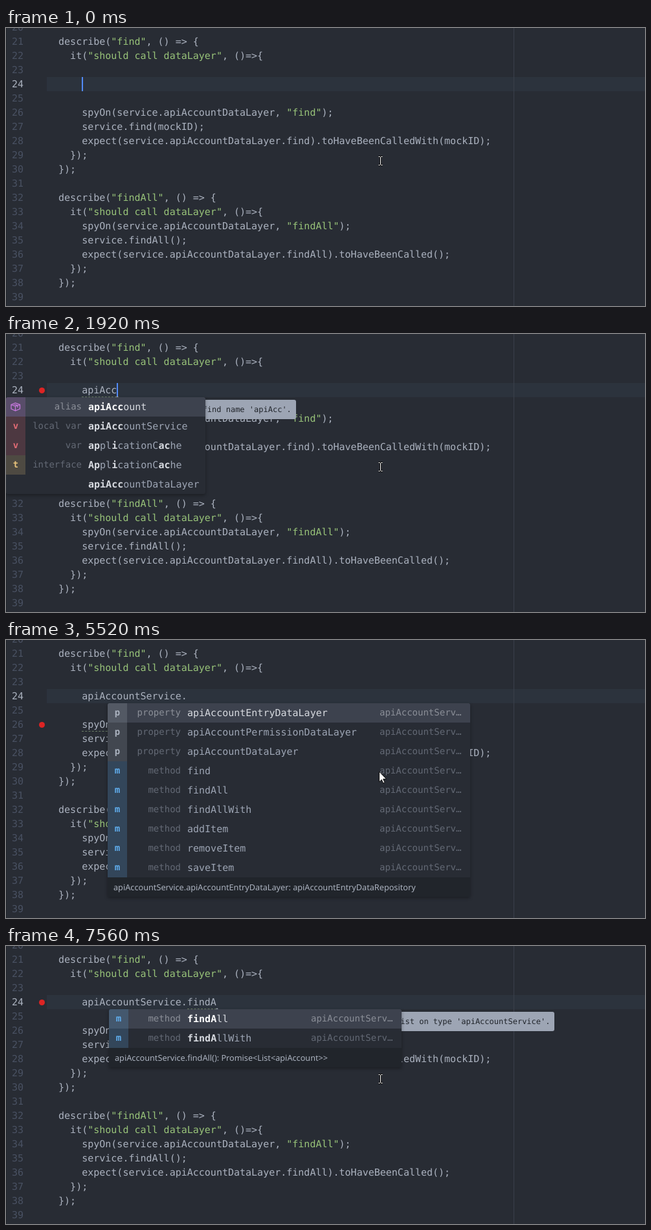
Recreate the animation shown at these times as an HTML page. Size 987 px wide and 431 px high, loop 8000 ms.

```html
<!DOCTYPE html>
<html lang="en">
<head>
<meta charset="utf-8">
<title>Autocomplete in a code editor</title>
<style>
html, body { margin: 0; width: 100%; height: 100%; overflow: hidden; background: #282c34; }
#stage { position: relative; width: 987px; height: 431px; overflow: hidden; color: #abb2bf;
  font: 15px/22px "DejaVu Sans Mono", monospace; white-space: pre; text-rendering: geometricPrecision; }
#stage *, #stage ::before { position: absolute; box-sizing: border-box; }
#stage i, #stage b { position: static; }
i { font-style: normal; color: #98c379; }
.edge { left: 0; width: 1px; height: 431px; background: #1f2329; }
.guide { left: 784px; width: 1px; height: 431px; background: #3a3f4a; }
.now { left: 63px; right: 0; top: 76px; height: 22px; background: #2c333d; }
.num { left: 0; width: 27px; text-align: right; color: #495162; }
.num.on { color: #abb2bf; }
.code { left: 63px; }
.caret { top: 76px; width: 2px; height: 22px; background: #528bff; }
.wave { height: 22px; border-bottom: 1px dashed #6c7f66; }
.dot { left: 51px; width: 9px; height: 9px; border-radius: 50%; background: #dd2424; }
.tip { top: 102px; height: 30px; padding: 0 7px 0 92px; border-radius: 3px; background: #9da5b4;
  color: #21252b; font-size: 12px; line-height: 30px; }
.tip::before { content: ""; left: 5px; top: -6px; border: 6px solid transparent; border-top: 0; border-bottom-color: #9da5b4; }
.pop { top: 98px; border-radius: 3px; background: #282c34; box-shadow: 0 2px 5px rgba(0, 0, 0, .35); overflow: hidden; }
.clip { inset: 0; border-radius: 3px; overflow: hidden; }
.row { left: 0; height: 30px; line-height: 30px; color: #9da5b4; }
.row.on { background: #3d424e; color: #d7dae0; }
.row b { color: #d7dae0; }
.row.on b { color: #fff; }
.icon { left: 0; width: 30px; height: 30px; text-align: center; font-weight: bold; font-size: 14px; }
.icon::before { content: ""; inset: 0; background: currentColor; opacity: .2; }
.icon svg { left: 0; top: 0; }
.kind, .side { font-size: 14px; opacity: .5; }
.side { right: 8px; max-width: 132px; overflow: hidden; text-overflow: ellipsis; }
.foot { left: 0; right: 0; height: 30px; padding-left: 9px; background: #21252b; color: #abb2bf;
  font: 12.7px/30px "Noto Sans", sans-serif; }
.bar { right: 3px; top: 3px; width: 4px; height: 137px; border-radius: 2px; background: #424752; }
.mouse { left: 570px; top: 196px; }
</style>
</head>
<body>
<div id="stage"></div>
<script>
const LOOP = 8000, LEFT = 63, CHAR = 9.03;
const stage = document.getElementById('stage');
const lineTop = n => 76 + (n - 24) * 22;
const colX = c => LEFT + c * CHAR;
const esc = s => s.replace(/&/g, '&amp;').replace(/</g, '&lt;');
const box = (cls, style, inner = '') => `<div class="${cls}" style="${style}">${inner}</div>`;

const code = `
  describe("find", () => {
    it("should call dataLayer", ()=>{



      spyOn(service.apiAccountDataLayer, "find");
      service.find(mockID);
      expect(service.apiAccountDataLayer.find).toHaveBeenCalledWith(mockID);
    });
  });

  describe("findAll", () => {
    it("should call dataLayer", ()=>{
      spyOn(service.apiAccountDataLayer, "findAll");
      service.findAll();
      expect(service.apiAccountDataLayer.findAll).toHaveBeenCalled();
    });
  });
`.split('\n');

const svg = d => `<svg width="30" height="30" fill="none" stroke="currentColor" stroke-width="1.3">${d}</svg>`;
const icons = {
  a: ['#c678dd', svg('<path d="M8 11.5 14.5 9 21.5 11.5V18L14.5 21 8 18ZM8 11.5 14.5 14 21.5 11.5M14.5 14V21M11 10.3 18 12.8V16"/>')],
  v: ['#e06c75', 'v'],
  t: ['#e5c07b', 't'],
  p: ['#abb2bf', 'p'],
  m: ['#61afef', 'm'],
  s: ['#98c379', svg('<path d="M7 15H14M21.5 10V20" stroke-width="2.6"/><path d="M13 10.5 19 15 13 19.5Z" fill="currentColor" stroke="none"/>')]
};

// icon | kind | word | side label
const list = s => s.trim().split('\n').map(r => r.split('|'));
const many = list(`
a|alias|apiAccount
v|local var|apiAccountService
v|var|applicationCache
t|interface|ApplicationCache
t|interface|EXT_texture_filter_anisotropic
t|interface|MSGraphicsTrust
t|interface|MSAppAsyncOperation
t|interface|AudioProcessingEvent
v|var|onafterprint
t|interface|XPathExpression`);
const layer = ['', '', 'apiAccountDataLayer'];
const some = [...many.slice(0, 4), ['t', 'interface', 'MSExecAtPriorityFunctionCallback'], layer];
const few = [...many.slice(0, 4), layer];
const members = list(`
p|property|apiAccountEntryDataLayer
p|property|apiAccountPermissionDataLayer
p|property|apiAccountDataLayer
m|method|find
m|method|findAll
m|method|findAllWith
m|method|addItem
m|method|removeItem
m|method|saveItem`).map(r => [...r, 'apiAccountService']);
const finds = members.slice(3, 6);
const snippets = [...finds, ['s', '', 'forin', 'forin'], ['s', '', 'function', 'function']];

// Bold the letters of the query, preferring adjacent pairs.
function mark(word, query) {
  const low = word.toLowerCase(), q = query.toLowerCase(), hit = new Set();
  let from = 0;
  for (let k = 0; k < q.length; k++) {
    let at = k + 1 < q.length ? low.indexOf(q.slice(k, k + 2), from) : -1;
    if (at < 0) at = low.indexOf(q[k], from);
    if (at < 0) break;
    hit.add(at);
    from = at + 1;
  }
  return [...word].map((c, i) => hit.has(i) ? `<b>${c}</b>` : c).join('');
}

const names = (rows, query, w, more) => ({ x: 0, w, split: 117, rows, query, ...more });
const memberPop = { x: 157, w: 560, split: 113, rows: members, query: '',
  foot: 'apiAccountService.apiAccountEntryDataLayer: apiAccountEntryDataRepository' };
const findPop = (rows, query, foot = 'find(modelID: string): Promise<apiAccount>') =>
  ({ x: 159, w: 452, split: 111, rows, query, foot: 'apiAccountService.' + foot });

const steps = [
  [0, { text: '', caret: true }],
  [240, { text: 'a' }],
  [480, { text: 'ap', pop: names(many, 'ap', 409, { bar: true }) }],
  [720, { text: 'api', pop: names(many, 'api', 426, { bar: true }) }],
  [840, { text: 'apiA' }],
  [960, { pop: names(some, 'apiA', 426), dot: 24, wave: [24, 6, 3] }],
  [1080, { text: 'apiAc' }],
  [1200, { text: 'apiAcc', pop: names(some, 'apiAc', 426) }],
  [1320, { pop: names(few, 'apiAcc', 308) }],
  [1560, { caret: false }],
  [1680, { wave: [24, 6, 6], tip: "Cannot find name 'apiAcc'." }],
  [1920, { caret: true }],
  [2040, { pop: names(few, 'apiAcc', 308, { sel: 1 }) }],
  [2280, { text: 'apiAccountService', pop: null, tip: null, dot: 0, wave: null }],
  [2640, { text: 'apiAccountService.' }],
  [2880, { pop: memberPop }],
  [3120, { dot: 26, wave: [26, 6, 5] }],
  [3240, { caret: false }],
  [3600, { caret: true }],
  [3960, { caret: false }],
  [4320, { caret: true }],
  [4680, { caret: false }],
  [5040, { caret: true }],
  [5520, { caret: false }],
  [5760, { text: 'apiAccountService.f', caret: true }],
  [5880, { text: 'apiAccountService.fin', pop: findPop(snippets, 'fi') }],
  [6000, { text: 'apiAccountService.find', pop: findPop(snippets, 'fin') }],
  [6120, { pop: findPop(finds, 'find') }],
  [6360, { text: 'apiAccountService.findA' }],
  [6480, { pop: findPop(finds.slice(1), 'findA', 'findAll(): Promise<List<apiAccount>>'), dot: 0, wave: null }],
  [6840, { caret: false, dot: 24, wave: [24, 24, 5],
    tip: "Property 'findA' does not exist on type 'apiAccountService'." }],
  [7200, { caret: true }],
  [7560, { caret: false }]
];
let last = {};
const states = steps.map(([at, change]) => last = { ...last, ...change, at });

function popup({ x, w, split, rows, query, foot, bar, sel = 0 }) {
  const rowW = bar ? w - 10 : w;
  let out = rows.map(([icon, kind, word, side], i) => {
    const [color, glyph] = icons[icon] || [];
    return box('row' + (i === sel ? ' on' : ''), `top:${i * 30}px;width:${rowW}px`,
      (icon ? box('icon', `color:${color}`, glyph) : '') +
      box('kind', `right:${rowW - split}px`, kind) +
      box('word', `left:${split + 10}px`, mark(word, query)) +
      (side ? box('side', '', side) : ''));
  }).join('');
  const h = rows.length * 30;
  if (foot) out += box('foot', `top:${h}px`, esc(foot));
  if (bar) out += box('bar', '');
  return box('pop', `left:${x}px;width:${w}px;height:${h + (foot ? 30 : 0)}px`, out);
}

function mouse(pop) {
  const over = pop && pop.x + pop.w > 578 && pop.rows.length * 30 + (pop.foot ? 30 : 0) > 108;
  const beam = 'M5.5 3.5H7.5L8.5 4.5 9.5 3.5H11.5M8.5 4.5V15.5M5.5 16.5H7.5L8.5 15.5 9.5 16.5H11.5';
  const shape = over
    ? '<path d="M6.5 8V24L10.2 20.5 12.7 26 15 25 12.6 19.6H17.5Z" fill="#fff" stroke="#111"/>'
    : `<path d="${beam}" fill="none" stroke="#111" stroke-width="3"/><path d="${beam}" fill="none" stroke="#fff"/>`;
  return `<svg class="mouse" width="24" height="30">${shape}</svg>`;
}

function draw({ text, caret, pop, dot, wave, tip }) {
  let out = box('edge', '') + box('now', '');
  code.forEach((line, i) => {
    const n = 20 + i, top = `top:${lineTop(n)}px`;
    out += box(n === 24 ? 'num on' : 'num', top, n);
    const src = n === 24 ? ' '.repeat(6) + text : line;
    out += box('code', top, esc(src).replace(/"[^"]*"/g, '<i>$&</i>'));
  });
  out += box('guide', '');
  const end = Math.round(colX(6 + text.length));
  if (wave) out += box('wave', `top:${lineTop(wave[0])}px;left:${colX(wave[1])}px;width:${wave[2] * CHAR}px`);
  if (dot) out += box('dot', `top:${lineTop(dot) + 7}px`);
  if (caret) out += box('caret', `left:${end}px`);
  if (tip) out += box('tip', `left:${end - 10}px`, tip);
  if (pop) out += popup(pop);
  stage.innerHTML = out + mouse(pop);
}

let shown;
function tick() {
  const t = performance.now() % LOOP;
  const state = states.findLast(s => s.at <= t);
  if (state !== shown) draw(shown = state);
  requestAnimationFrame(tick);
}
tick();
</script>
</body>
</html>
```
